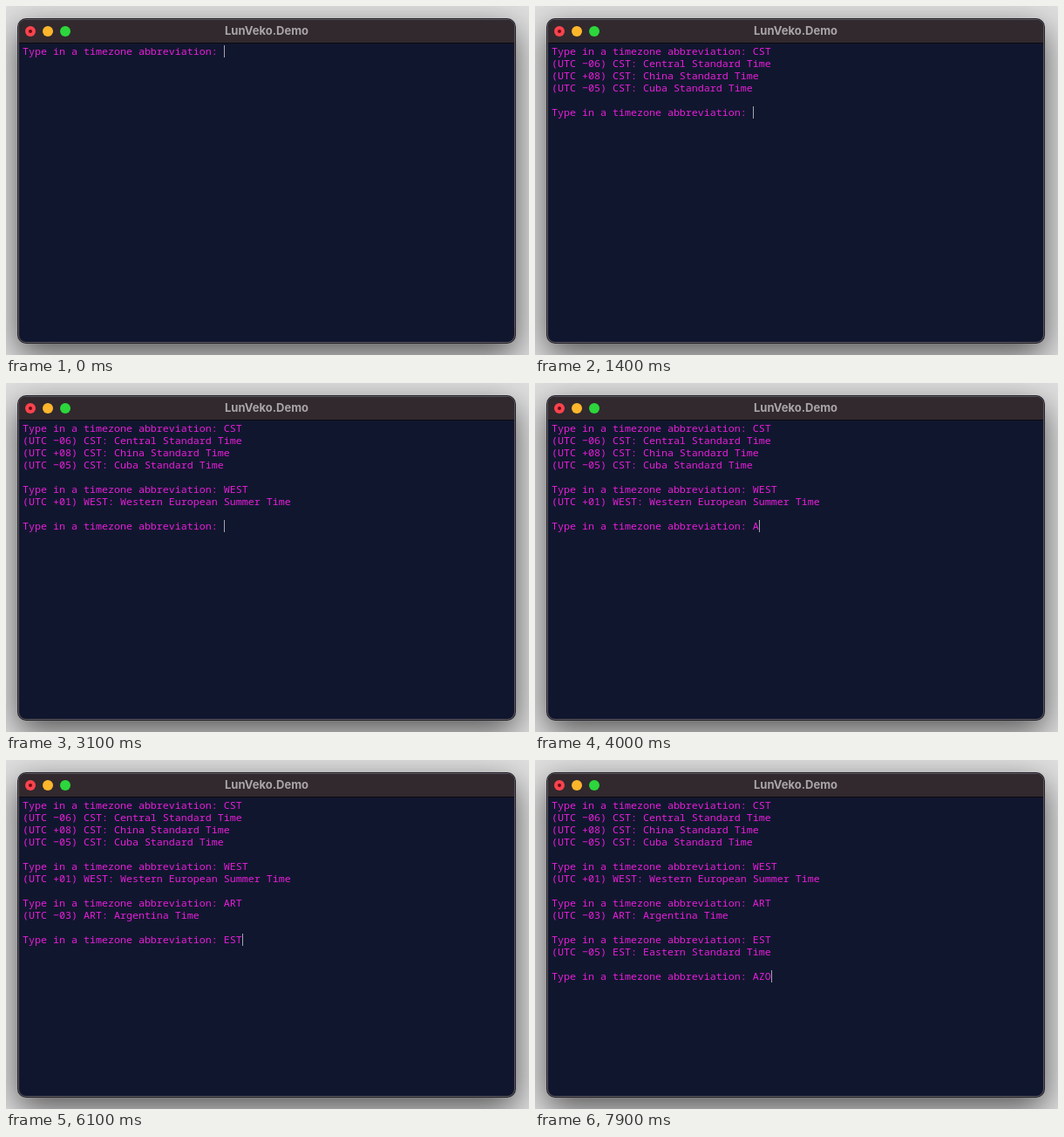
Recreate the animation shown at these times as an HTML page with a canvas. Size 600 by 400 pixels, loop 8 s.

```html
<!DOCTYPE html>
<html lang="en">
<head>
<meta charset="utf-8">
<title>Timezone terminal</title>
<style>
  html, body { margin: 0; width: 100%; height: 100%; overflow: hidden; background: #e0dfe0; }
  canvas { display: block; width: 600px; height: 400px; }
</style>
</head>
<body>
<canvas id="stage" width="600" height="400"></canvas>
<script>
const ctx = document.getElementById('stage').getContext('2d');

const LOOP = 8000;
const PROMPT = 'Type in a timezone abbreviation: ';
const CELL = 7, LINE = 14, LEFT = 19, BASE = 56;

// keys: time of each typed letter; enter: when the answer is printed
const queries = [
  { word: 'CST', keys: [500, 800, 1000], enter: 1400, answer: [
    '(UTC −06) CST: Central Standard Time',
    '(UTC +08) CST: China Standard Time',
    '(UTC −05) CST: Cuba Standard Time'] },
  { word: 'WEST', keys: [2100, 2300, 2500, 2700], enter: 3100, answer: [
    '(UTC +01) WEST: Western European Summer Time'] },
  { word: 'ART', keys: [4000, 4200, 4500], enter: 4800, answer: [
    '(UTC −03) ART: Argentina Time'] },
  { word: 'EST', keys: [5700, 5900, 6100], enter: 6700, answer: [
    '(UTC −05) EST: Eastern Standard Time'] },
  { word: 'AZO', keys: [7300, 7700, 7900], enter: Infinity, answer: [] }
];

function linesAt(t) {
  const lines = [];
  for (const q of queries) {
    const typed = q.keys.filter(k => k <= t).length;
    lines.push(PROMPT + q.word.slice(0, typed));
    if (t < q.enter) break;
    lines.push(...q.answer, '');
  }
  return lines;
}

function box(x, y, w, h, r, fill) {
  ctx.beginPath();
  ctx.roundRect(x, y, w, h, r);
  ctx.fillStyle = fill;
  ctx.fill();
}

function dot(x, y, r, fill) {
  ctx.beginPath();
  ctx.arc(x, y, r, 0, Math.PI * 2);
  ctx.fillStyle = fill;
  ctx.fill();
}

function drawWindow() {
  ctx.fillStyle = '#e0dfe0';
  ctx.fillRect(0, 0, 600, 400);

  ctx.save();
  ctx.shadowColor = 'rgba(0,0,0,0.62)';
  ctx.shadowBlur = 38;
  ctx.shadowOffsetY = 13;
  box(13, 14, 572, 373, 10, '#25232a');
  ctx.restore();

  box(14, 15, 570, 371, 9, '#5b575e');
  box(15, 16, 568, 369, 8, '#11162f');
  box(15, 16, 568, 27, [8, 8, 0, 0], '#31292d');
  ctx.fillStyle = '#0b0a10';
  ctx.fillRect(15, 42, 568, 1);

  dot(28, 29, 6, '#f9434e');
  dot(28, 29, 2, '#6a0a10');
  dot(48, 29, 6, '#fdb62c');
  dot(68, 29, 6, '#2cd63c');

  ctx.font = 'bold 13px Inter, sans-serif';
  ctx.textAlign = 'center';
  ctx.fillStyle = '#aaa5a8';
  ctx.fillText('LunVeko.Demo', 299, 33);
}

function drawText(lines) {
  ctx.font = '11.667px "Noto Sans Mono", monospace';
  ctx.textAlign = 'left';
  ctx.fillStyle = '#e81fd9';
  lines.forEach((line, i) => ctx.fillText(line, LEFT, BASE + i * LINE));

  const row = lines.length - 1;
  ctx.fillStyle = '#a5a5ad';
  ctx.fillRect(LEFT + lines[row].length * CELL, 45 + row * LINE, 1, LINE);
}

const start = performance.now();

function frame() {
  const t = (performance.now() - start) % LOOP;
  drawWindow();
  drawText(linesAt(t));
  requestAnimationFrame(frame);
}
frame();
</script>
</body>
</html>
```
